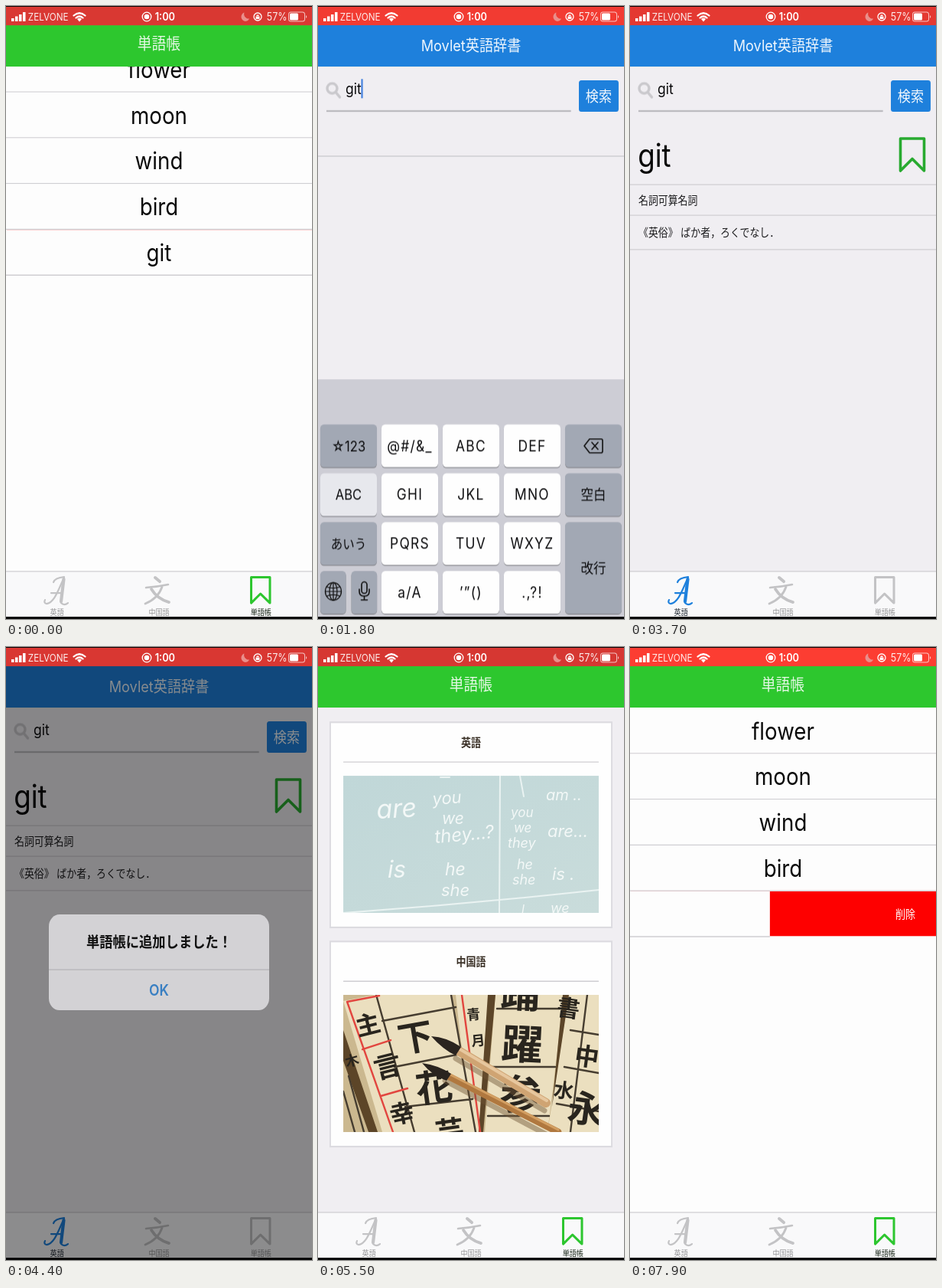
An HTML page that plays this animation: 400x800 px, repeating every 8000 ms.

```html
<!DOCTYPE html>
<html lang="ja">
<head>
<meta charset="utf-8">
<title>単語帳</title>
<style>
html, body { margin: 0; width: 100%; height: 100%; overflow: hidden; background: #050505; }
#phone { position: absolute; left: 0; top: 1px; width: 400px; height: 796px; overflow: hidden; }
text { font-family: Inter, "Noto Sans CJK JP", "Noto Sans CJK", sans-serif; }
.mid { text-anchor: middle; }
.px { transform: scale(.9375, .838) translateY(-1px); }
.line { stroke: #cfced2; stroke-width: 1.1; }
.ink { fill: none; stroke: currentColor; stroke-linecap: round; stroke-linejoin: round; }
.white { color: #fff; fill: #fff; }

/* one shared 8 s clock */
.clip, .step { animation: 8s linear infinite; }
.step { animation-timing-function: step-end; }

#bar { animation: pulse 1s ease-in-out infinite; }
@keyframes pulse { 0%, 100% { fill: #ff3d32; } 50% { fill: #d63732; } }
#barStart { animation-name: start; }
@keyframes start { 0% { opacity: 1; } 1.25%, 100% { opacity: 0; } }
#carrier { animation-name: carrier; }
@keyframes carrier { 0% { opacity: 1; } 1.25% { opacity: 0; } 17.5%, 100% { opacity: 1; } }
#recording { animation-name: recording; }
@keyframes recording { 0% { opacity: 0; } 1.25% { opacity: 1; } 17.5%, 100% { opacity: 0; } }

.english { animation-name: english; }
@keyframes english { 0% { opacity: 0; } 1.25% { opacity: 1; } 62.5%, 100% { opacity: 0; } }
#tabA { animation-name: tabA; }
@keyframes tabA { 0% { color: #c3c3c5; } 1.25% { color: #1e80dc; } 62.5%, 100% { color: #c3c3c5; } }
#tabB { animation-name: tabB; }
@keyframes tabB { 0% { color: #2dc62f; } 1.25% { color: #c3c3c5; } 62.5%, 100% { color: #2dc62f; } }
#labelA { animation-name: labelA; }
@keyframes labelA { 0% { fill: #949496; } 1.25% { fill: #1c2530; } 62.5%, 100% { fill: #949496; } }
#labelB { animation-name: labelB; }
@keyframes labelB { 0% { fill: #1d2a1c; } 1.25% { fill: #949496; } 62.5%, 100% { fill: #1d2a1c; } }

#keyboard { animation-name: keyboard; animation-timing-function: ease-out; }
@keyframes keyboard {
  0%, 6.25% { transform: translateY(262px); }
  10%, 23.75% { transform: none; }
  26.25%, 100% { transform: translateY(262px); }
}
#hint { animation-name: hint; }
@keyframes hint { 0% { opacity: 1; } 15%, 100% { opacity: 0; } }
#c1 { animation-name: c1; }
#c2 { animation-name: c2; }
#c3 { animation-name: c3; }
@keyframes c1 { 0% { fill-opacity: 0; } 15%, 100% { fill-opacity: 1; } }
@keyframes c2 { 0% { fill-opacity: 0; } 18.75%, 100% { fill-opacity: 1; } }
@keyframes c3 { 0% { fill-opacity: 0; } 21.25%, 100% { fill-opacity: 1; } }
#caret { animation-name: caret; }
@keyframes caret {
  0% { opacity: 0; } 7.5% { opacity: 1; transform: none; }
  15% { opacity: 1; transform: translateX(10px); }
  18.75% { opacity: 1; transform: translateX(14px); }
  21.25% { opacity: 1; transform: translateX(20px); }
  23.75%, 100% { opacity: 0; }
}

#hud { animation-name: hud; }
@keyframes hud { 0%, 26.25% { opacity: 0; } 29%, 40% { opacity: 1; } 43%, 100% { opacity: 0; } }
#spin { transform-origin: 186px 332px; animation: spin 1s steps(12) -.25s infinite; }
@keyframes spin { to { transform: rotate(360deg); } }
#result { animation-name: result; }
@keyframes result { 0% { opacity: 0; } 40%, 100% { opacity: 1; } }
#shade, #alert { animation-name: shade; }
@keyframes shade { 0%, 48.75% { opacity: 0; } 51.25%, 57.5% { opacity: 1; } 60%, 100% { opacity: 0; } }
#pop { transform-origin: 187.5px 344px; animation-name: pop; animation-timing-function: ease-out; }
@keyframes pop { 0%, 48.75% { transform: scale(1.15); } 51.25%, 100% { transform: none; } }

#cards { animation-name: cards; animation-timing-function: ease-out; }
@keyframes cards { 0%, 73.75% { transform: none; } 77.5%, 100% { transform: translateX(-112px); } }
#list { animation-name: list; animation-timing-function: ease-out; }
@keyframes list {
  0%, 1.249% { transform: none; }
  1.25%, 73.75% { transform: translateX(376px); }
  77.5%, 100% { transform: none; }
}
#rows { animation-name: rows; animation-timing-function: ease-out; }
@keyframes rows {
  0%, 1.249% { transform: translateY(-22.4px); }
  1.25%, 78.75% { transform: none; }
  81.25%, 83.75% { transform: translateY(-22.4px); }
  87.5%, 100% { transform: none; }
}
#swipe { animation-name: swipe; }
@keyframes swipe {
  0%, 91.25% { transform: none; }
  98.75% { transform: translateX(-203.4px); }
  100% { transform: translateX(-220px); }
}
</style>
</head>
<body>
<svg id="phone" viewBox="0 0 375 667" preserveAspectRatio="none">
  <rect width="375" height="667" fill="#f0eef2"/>

  <!-- notebook cards -->
  <g id="cards" class="clip">
    <g fill="#fefefe" stroke="#dcdbe0" stroke-width="1.8">
      <rect x="15" y="81.5" width="345" height="224.3"/>
      <rect x="15" y="321.2" width="345" height="224.3"/>
    </g>
    <g class="mid" font-size="12.2" font-weight="700" fill="#3a3026">
      <text x="187.5" y="108">英語</text>
      <text x="187.5" y="347.6">中国語</text>
    </g>
    <path class="line" d="M31 125H344M31 364.7H344"/>
    <svg x="31" y="140" width="313" height="150" viewBox="33 168 334 179" preserveAspectRatio="none">
      <linearGradient id="board" x2="1" y2="1">
        <stop stop-color="#c0d7d8"/><stop offset="1" stop-color="#c9dcdb"/>
      </linearGradient>
      <rect x="33" y="168" width="334" height="179" fill="url(#board)"/>
      <path class="ink" color="#eaf3f2" stroke-width="2" d="M238 168L237 347M33 347Q200 335 367 317M264 168L269 195M160 170H172"/>
      <g id="chalk" fill="#f3f8f7" font-style="italic"></g>
    </svg>
    <svg x="31" y="379.6" width="313" height="150" viewBox="33 454 334 179" preserveAspectRatio="none">
      <rect x="33" y="454" width="334" height="179" fill="#cbb88f"/>
      <path fill="#ebdfbf" d="M33 462L75 454L125 633H84ZM76 454H174L206 633H126ZM180 454H224L210 633H200ZM232 454H322L300 633H218ZM328 454H367V633H300Z"/>
      <path fill="#5c4528" d="M33 500L78 633H66L33 540ZM222 454H232L216 633H210ZM320 454H328L306 600Z"/>
      <path class="ink" color="#463d30" stroke-width="2.4" d="M76 454L126 633M174 454L206 633M84 488L180 470M100 548L192 530M114 600L202 590M234 472H320M228 548H310M222 612H302M330 500L367 506M322 548L367 556M312 596L367 606M352 454L330 633M40 560L60 633M33 580L48 633"/>
      <path class="ink" color="#e2463f" stroke-width="2.4" d="M38 463L98 633M38 463L80 455M58 525L95 513M82 586L117 576M188 454L212 633"/>
      <g id="brushwork" class="mid" fill="#29251e" font-weight="700"></g>
      <g class="ink" stroke-linecap="butt">
        <path color="#6d5334" opacity=".45" stroke-width="7" d="M180 537L296 605M166 566L306 640"/>
        <path color="#cfa473" stroke-width="12" d="M182 526L298 595"/>
        <path color="#e7c79e" stroke-width="4" d="M184 524L299 592"/>
        <path color="#b0783f" stroke-width="9" d="M170 560L314 633"/>
        <path color="#d39f62" stroke-width="3" d="M171 557L314 630"/>
      </g>
      <path fill="#2a241f" d="M148 508Q168 509 187 522L180 533Q164 526 148 508ZM136 543Q158 546 174 557L168 566Q150 560 136 543Z"/>
    </svg>
  </g>

  <!-- word list -->
  <g id="list" class="clip">
    <rect y="65" width="375" height="553" fill="#fdfdfd"/>
    <g id="rows" class="clip"></g>
  </g>

  <!-- dictionary -->
  <g class="english step">
    <rect y="65" width="375" height="553" fill="#f0eef2"/>
    <g class="px ink" color="#cac9cd" stroke-width="3.4"><circle cx="18.5" cy="107.5" r="6.5"/><path d="M23.5 113L28.5 119"/></g>
    <path stroke="#9f9ea3" stroke-width="1.1" d="M10.3 114H310"/>
    <text id="hint" class="step" x="33.7" y="95.5" font-size="16" fill="#8c8b91">Input the word</text>
    <text x="33.7" y="95.5" font-size="16.4" fill="#0a0a0c"><tspan id="c1" class="step">g</tspan><tspan id="c2" class="step">i</tspan><tspan id="c3" class="step">t</tspan></text>
    <rect id="caret" class="step" x="33" y="79" width="1.9" height="21" fill="#3577dd"/>
    <rect x="319.7" y="80.4" width="48.7" height="34.4" rx="3" fill="#1e80dc"/>
    <text class="mid" x="344" y="104" font-size="16" fill="#f4f8fc">検索</text>
    <path class="line" d="M0 163.4H375"/>
    <g id="result" class="step">
      <rect y="162" width="375" height="30" fill="#f0eef2"/>
      <text x="9.5" y="175.4" font-size="34.5" fill="#080808">git</text>
      <path class="px ink" color="#28aa30" stroke-width="3.6" d="M353.5 173H384.5V215L369 199.5L353.5 215Z"/>
      <g font-size="12.1" fill="#1c1c1e">
        <text x="10.3" y="215.8">名詞可算名詞</text>
        <text x="10.3" y="251">《英俗》 ばか者，ろくでなし．</text>
      </g>
      <path class="line" d="M0 194.5H375M0 228H375M0 265.6H375"/>
    </g>
  </g>

  <!-- navigation bar -->
  <rect y="20" width="375" height="45.4" fill="#2dc72e"/>
  <text class="mid white" x="187.5" y="46.2" font-size="17.6" font-weight="300" fill-opacity=".88">単語帳</text>
  <g class="english step">
    <rect y="20" width="375" height="45.4" fill="#1e80dc"/>
    <text class="mid white" x="187.5" y="48.8" font-size="17" fill-opacity=".92">Movlet英語辞書</text>
  </g>

  <!-- tab bar -->
  <rect y="617.5" width="375" height="50" fill="#f9f9fa"/>
  <path class="line" d="M0 617.5H375"/>
  <g class="px ink">
    <g id="tabA" class="step">
      <path stroke-width="2.2" d="M76 746C70 757 64 779 53 780Q49 779 51 775M59 766H74M62 752Q64 746 76 745"/>
      <path stroke-width="4.2" d="M75.5 748L72 777"/>
      <path stroke-width="2.2" d="M72 779Q76 783 81 779"/>
    </g>
    <g color="#c3c3c5">
      <path stroke-width="4" d="M195 746L201 751"/>
      <path stroke-width="2.6" d="M183 759Q198 758 212 755"/>
      <path stroke-width="2.8" d="M204 758Q199 773 182 780"/>
      <path stroke-width="3.8" d="M190 761Q198 774 213 778"/>
    </g>
    <path id="tabB" class="step" stroke-width="3" d="M320.5 745.5H345V779L332.7 767L320.5 779Z"/>
  </g>
  <g class="mid" font-size="8.5" fill="#949496">
    <text id="labelA" class="step" x="62.5" y="665.2">英語</text>
    <text x="187.5" y="665.2">中国語</text>
    <text id="labelB" class="step" x="312.5" y="665.2">単語帳</text>
  </g>

  <g id="keyboard" class="clip">
    <rect y="407.2" width="375" height="262" fill="#cdcdd5"/>
    <g id="keys" class="mid" fill="#0c0c0e"></g>
    <g class="px ink" color="#111" stroke-width="1.6">
      <path d="M348 574L355 565H370Q372 565 372 567V581Q372 583 370 583H355ZM358 569.5L366 578.5M366 569.5L358 578.5"/>
      <path stroke-width="1.2" d="M9.5 764H30.5M20 752.5V775.5M11.5 758Q20 761.5 28.5 758M11.5 770Q20 766.5 28.5 770"/>
      <ellipse cx="20" cy="764" rx="10.5" ry="11.5" stroke-width="1.3"/>
      <ellipse cx="20" cy="764" rx="5" ry="11.5" stroke-width="1.2"/>
      <rect x="57" y="751.5" width="7" height="15" rx="3.5"/>
      <path d="M54 761V764Q54 770 60.5 770T67 764V761M60.5 770V775M56.5 775H64.5"/>
    </g>
  </g>

  <!-- searching overlay -->
  <g id="hud" class="clip">
    <rect y="20" width="375" height="647" opacity=".28"/>
    <g id="spin" stroke="#fff" stroke-width="3" stroke-linecap="round"></g>
    <text class="mid white" x="187.5" y="405" font-size="17.5" font-weight="700">検索中</text>
  </g>

  <!-- added notice -->
  <rect id="shade" class="clip" y="20" width="375" height="647" fill="rgba(0,0,0,.44)"/>
  <g id="alert" class="clip">
    <g id="pop" class="clip">
      <rect x="52.5" y="291.7" width="270" height="104.7" rx="13" fill="#d3d2d5"/>
      <path stroke="#b4b3b7" d="M52.5 352H322.5"/>
      <text class="mid" x="187.5" y="328" font-size="16.2" font-weight="600" fill="#111">単語帳に追加しました！</text>
      <text class="mid" x="187.5" y="380.5" font-size="16.5" font-weight="600" fill="#397fc2">OK</text>
    </g>
  </g>

  <!-- status bar -->
  <rect id="bar" width="375" height="20.2"/>
  <rect id="barStart" class="step" width="375" height="20.2" fill="#d93832"/>
  <g id="carrier" class="step white">
    <g class="px">
      <path d="M7 16H10.5V20H7ZM12 13.5H15.5V20H12ZM17 11H20.5V20H17ZM22 8H25.5V20H22Z"/>
      <path class="ink" stroke-width="2.3" stroke-linecap="butt" d="M88.5 12.5Q96 6 103.5 12.5M91.5 15.5Q96 11.5 100.5 15.5"/>
      <path d="M93 17Q96 14.5 99 17L96 20.5Z"/>
      <circle class="ink" cx="184" cy="14" r="5.8" stroke-width="1.3"/><circle cx="184" cy="14" r="3.3"/>
      <path fill="#e98f8b" d="M311.5 8.5A5.5 5.8 0 1 0 318 16.5A6 6 0 0 1 311.5 8.5Z"/>
      <circle class="ink" cx="329" cy="14" r="5" stroke-width="1.3"/><path d="M326.5 13.5H331.5V17H326.5ZM327.5 13V11.5H330.5V13Z"/>
      <rect class="ink" x="369.5" y="8" width="21" height="12" rx="3" stroke-width="1" opacity=".7"/>
      <rect x="371" y="9.5" width="11" height="9" rx="1.5"/><path d="M392 12Q394.5 14 392 16Z" opacity=".7"/>
    </g>
    <text x="27" y="15.2" font-size="11" fill-opacity=".9">ZELVONE</text>
    <text x="182.5" y="15.4" font-size="12" font-weight="600">1:00</text>
    <text x="319.5" y="15.4" font-size="11.7" fill-opacity=".9">57%</text>
  </g>
  <g id="recording" class="step white" opacity="0">
    <g class="px"><circle class="ink" cx="180" cy="14" r="5.8" stroke-width="1.3"/><circle cx="180" cy="14" r="3.3"/></g>
    <text x="179" y="15.2" font-size="11" fill-opacity=".8">収録中</text>
  </g>
</svg>
<script>
const fill = (id, parts) => { document.getElementById(id).innerHTML = parts.join(""); };

// word rows; the last one slides away over a delete button
const rowH = 50.1, top0 = 65.4, edge = .6;
fill("rows", ["flower", "moon", "wind", "bird", "git"].map((word, i, all) => {
  const y = top0 + rowH * i, last = i === all.length - 1;
  const box = (x, h, color) => `<rect x="${x}" y="${y + edge}" width="${375 - x}" height="${h}" fill="${color}"/>`;
  const body = box(0, rowH - edge, "#fdfdfd") +
    `<text class="mid" x="187.5" y="${y + 34.8}" font-size="26" fill="#0a0a0a">${word}</text>` +
    `<path class="line" d="M0 ${y + rowH}H375"/>`;
  return last
    ? box(1, rowH - 2 * edge, "#fe0000") +
      `<text class="mid white" x="337.5" y="${y + 29.6}" font-size="12.2">削除</text>
       <g id="swipe" class="clip">${body}</g>`
    : body;
}));

// keypad: label, column, row, then optional tone, size, width, height
const grey = "#a2a8b4", pitch = 53.4;
const key = ([label, col, row, tone = "#fefefe", size = 16.3, w = 69.4, h = 46.8]) => {
  const x = 2.8 + 75 * col, y = 456.7 + pitch * row;
  const gap = tone === "#fefefe" ? 1.2 : 0;
  const box = (dy, color) => `<rect x="${x}" y="${y + dy}" width="${w}" height="${h}" rx="4.5" fill="${color}"/>`;
  return box(1, "#8b8c92") + box(0, tone) +
    `<text x="${x + w / 2}" y="${y + h / 2 + 5.8}" font-size="${size}" letter-spacing="${gap}">${label}</text>`;
};
fill("keys", [
  ["☆123", 0, 0, grey, 15.5], ["@#/&amp;_", 1, 0], ["ABC", 2, 0], ["DEF", 3, 0], ["", 4, 0, grey],
  ["ABC", 0, 1, "#e7e8ed", 15.5], ["GHI", 1, 1], ["JKL", 2, 1], ["MNO", 3, 1], ["空白", 4, 1, grey, 15.5],
  ["あいう", 0, 2, grey, 14.5], ["PQRS", 1, 2], ["TUV", 2, 2], ["WXYZ", 3, 2],
  ["改行", 4, 2, grey, 15.5, 69.4, 46.8 + pitch],
  ["", 0, 3, grey, 15, 31.5], ["", .507, 3, grey, 15, 31.5],
  ["a/A", 1, 3], ["’”()", 2, 3], [".,?!", 3, 3]
].map(key));

fill("spin", Array.from({ length: 12 }, (_, i) =>
  `<path d="M186 323.5V316" transform="rotate(${-30 * i} 186 332)" opacity="${Math.max(.14, 1 - i * .085)}"/>`));

// handwriting: text, x, y, size, tilt
const write = ([s, x, y, size, tilt = 0]) =>
  `<text x="${x}" y="${y}" font-size="${size}" transform="rotate(${tilt} ${x} ${y})">${s}</text>`;
fill("chalk", [
  ["are", 77, 224, 34, -3], ["is", 91, 301, 31], ["you", 150, 206, 22, -4], ["we", 162, 231, 21],
  ["they…?", 153, 256, 24, -5], ["he", 166, 298, 23], ["she", 161, 325, 22], ["you", 252, 222, 17],
  ["we", 256, 242, 17], ["they", 248, 262, 18], ["he", 260, 290, 18], ["she", 254, 310, 18],
  ["am ..", 298, 200, 20], ["are…", 300, 248, 22], ["is .", 306, 304, 22], ["I", 266, 347, 15], ["we", 304, 347, 18]
].map(write));
fill("brushwork", [
  ["下", 130, 526, 46, -10], ["花", 154, 592, 48, -8], ["言", 94, 560, 36, -14], ["主", 68, 504, 32, -14],
  ["芸", 174, 646, 38, -8], ["踊", 264, 470, 52, 3], ["躍", 266, 538, 54, 3], ["参", 264, 604, 54, 3],
  ["永", 348, 620, 48, 8], ["書", 326, 482, 30, 8], ["中", 350, 546, 32, 8], ["幸", 112, 620, 32, -12],
  ["水", 320, 588, 26, 8], ["青", 204, 486, 18, -6], ["月", 210, 520, 18, -6], ["木", 46, 546, 18, -16]
].map(write));
</script>
</body>
</html>
```
